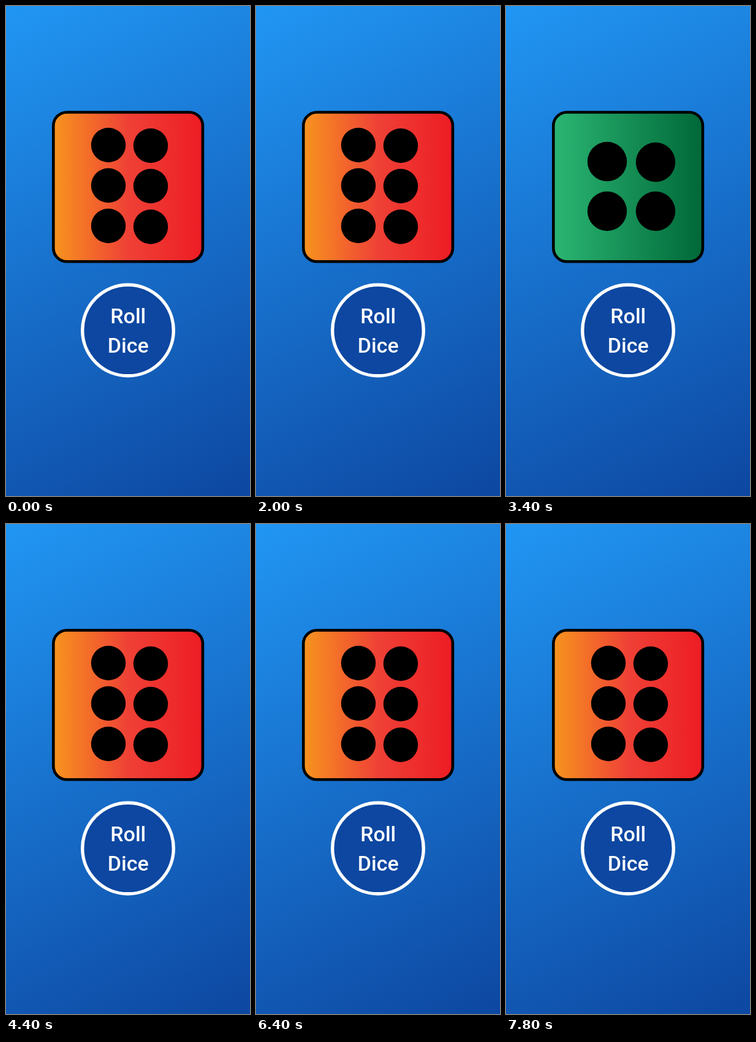
These frames come from a looping animation (398x800 px, 8 s). An HTML page:

```html
<!DOCTYPE html>
<html lang="en">
<head>
<meta charset="utf-8">
<title>Roll Dice</title>
<style>
  html, body { margin: 0; width: 100%; height: 100%; overflow: hidden; }
  svg { display: block; width: 100%; height: 100%; }
  text { font: 500 34px Roboto, sans-serif; fill: #fff; text-anchor: middle; }
</style>
</head>
<body>
<svg viewBox="0 0 398 800">
  <defs>
    <linearGradient id="sky" gradientUnits="userSpaceOnUse" x1="0" y1="0" x2="398" y2="800">
      <stop stop-color="#2196f3"/><stop offset="1" stop-color="#0d47a1"/>
    </linearGradient>
    <linearGradient id="fire">
      <stop stop-color="#f7941e"/><stop offset=".5" stop-color="#ef4136"/><stop offset="1" stop-color="#ed1c24"/>
    </linearGradient>
    <linearGradient id="leaf">
      <stop stop-color="#2bb673"/><stop offset="1" stop-color="#006838"/>
    </linearGradient>
    <radialGradient id="glow" gradientUnits="userSpaceOnUse" cx="212" cy="568" r="84">
      <stop stop-color="#fff" stop-opacity=".14"/><stop offset=".5" stop-color="#fff" stop-opacity=".09"/>
      <stop offset="1" stop-color="#fff" stop-opacity=".03"/>
    </radialGradient>
  </defs>
  <rect width="398" height="800" fill="url(#sky)"/>
  <rect id="die" x="77.3" y="173.5" width="243.6" height="243.8" rx="22" stroke="#000" stroke-width="4.6"/>
  <g id="pips"></g>
  <circle cx="199" cy="529.5" r="74.3" fill="#0d47a1" stroke="#fff" stroke-width="5.4"/>
  <circle id="ripple" cx="199" cy="529.5" r="71.6" fill="url(#glow)"/>
  <text x="199.3" y="517.8">Roll</text>
  <text x="199.3" y="565.6">Dice</text>
</svg>
<script>
const LOOP = 8000;
const faces = {
  4: { fill: 'leaf', radius: 32.2, pips: [[165, 254], [244, 255], [165, 335], [244, 335]] },
  6: { fill: 'fire', radius: 28.2, pips: [[167, 227], [236, 228], [167, 293], [236, 294], [167, 359], [236, 360.5]] }
};
const byId = id => document.getElementById(id);
const within = (t, start, end) => t >= start && t < end;
let shown;

function showFace(value) {
  if (value === shown) return;
  shown = value;
  const { fill, radius, pips } = faces[value];
  byId('die').setAttribute('fill', `url(#${fill})`);
  byId('pips').innerHTML = pips.map(([x, y]) => `<circle cx="${x}" cy="${y}" r="${radius}"/>`).join('');
}

function draw(now) {
  const t = now % LOOP;
  showFace(within(t, 3000, 4000) ? 4 : 6);
  byId('ripple').setAttribute('opacity', within(t, 1400, 1600) ? 1 : 0);
}

const start = performance.now();
function tick() {
  draw(performance.now() - start);
  requestAnimationFrame(tick);
}
tick();
</script>
</body>
</html>
```
